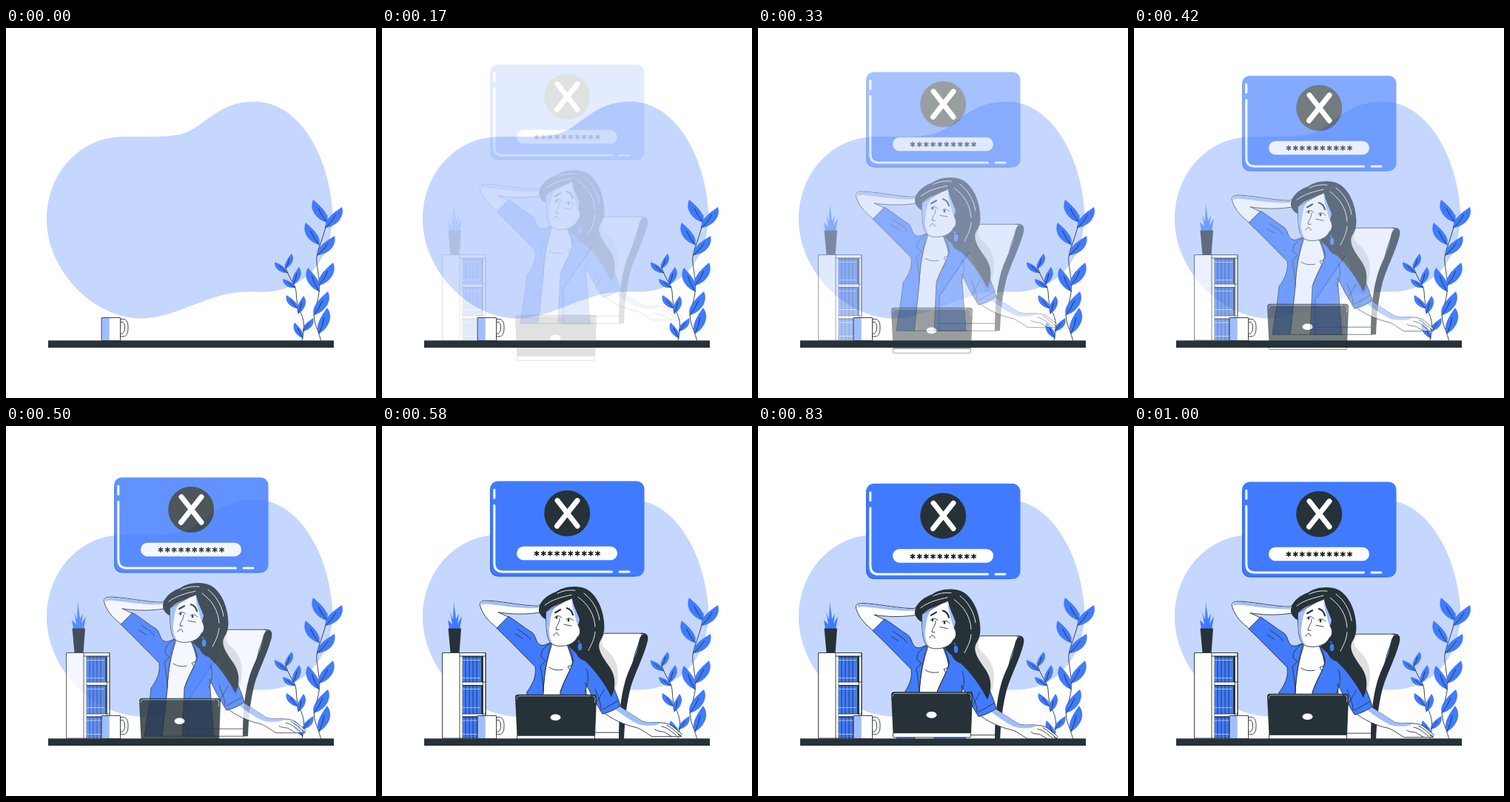
Write an HTML page that moves like this. It is 500 px wide and 500 px high and loops after 1040 ms.

```html
<!DOCTYPE html>
<html lang="en">
<head>
<meta charset="utf-8">
<title>Wrong password</title>
<style>
html, body { margin: 0; width: 100%; height: 100%; overflow: hidden; background: #fff; }
svg { display: block; width: 100vw; height: 100vh; }
.ink { fill: #263238; }
.blue { fill: #407bff; }
.pale { fill: #9fbdff; }
.white { fill: #fff; }
.line { fill: none; stroke: #263238; stroke-width: .9; stroke-linecap: round; stroke-linejoin: round; }
.edge { stroke: #263238; stroke-width: .9; stroke-linejoin: round; }
.shine { fill: none; stroke: #fff; stroke-linecap: round; stroke-linejoin: round; }
.stars { font: 14px "DejaVu Sans", sans-serif; letter-spacing: 2.17px; fill: #111; stroke: #111; stroke-width: .6; }
</style>
</head>
<body>
<svg viewBox="0 0 500 500">
  <path fill="#c5d7ff" d="M55 257C56 195 100 149 155 147C180 146 215 149 238 143C268 135 285 99 336 99.5C398 100 436 175 441 245C444 310 405 355 350 356.5C335 357 315 355 292 361C255 371 215 394 180 392.5C115 390 54 325 55 257Z"/>

  <g id="plants">
    <path class="line" d="M425.500 422C420 402 413 395 418 378C426 355 424 345 420 318C417 300 433 282 434 253M400 422C404 405 404 395 396 380C390 365 395 355 388 345C382 335 380 330 377 320"/>
  </g>

  <g id="shelf">
    <path class="blue" d="M91 275L89 262L95 268L92 251L96 262L97 238L100 261L104 253L102 267L108 257L105 275Z"/>
    <path class="ink" d="M89.500 273.500H107L104.500 306.500H92.500Z"/>
    <path class="white edge" d="M81.500 306.500H140V422H81.500Z"/>
    <path class="line" d="M105 306.500V422M109 311V422M105 311H140"/>
    <g id="books"></g>
  </g>

  <g id="mug">
    <path class="white edge" d="M154.500 394C163 391 165 398 165 405C165 414 162 418.500 154.500 416.500V413C158 414 160.500 411 160.500 405C160.500 399 158.500 396 154.500 398Z"/>
    <path class="white" d="M129.500 391.500H154.500V422.500H129.500Z"/>
    <path class="pale" d="M129.500 391.500H139.700V422.500H129.500Z"/>
    <path class="line" d="M129.500 391.500H154.500V422.500H129.500Z"/>
  </g>

  <g id="panel">
    <rect class="blue" x="146" y="77.200" width="208.500" height="129" rx="11"/>
    <path fill="none" stroke="#2f5fcf" d="M146.600 90V194Q146.600 205.600 158 205.600H342"/>
    <path class="shine" stroke-width="3" d="M151.800 89V100M151.800 110V188Q151.800 199.700 163 199.700H310.500M321 199.700H334"/>
    <circle class="ink" cx="250.200" cy="120.800" r="31"/>
    <path class="shine" stroke-width="7" d="M237 103.500L264 138M264 103.500L236.500 138"/>
    <rect class="white" x="182" y="165.500" width="136" height="18.500" rx="9.200"/>
    <text class="stars" x="205.500" y="181.900">**********</text>
  </g>

  <g id="chair">
    <path class="white edge" d="M286 320C288 300 292 283 302 283H352L342 310L322 395V427H245V380Z"/>
    <path fill="#e0e0e0" d="M291 284H301C297 290 295 297 302 304C317 316 321 332 318 348C316 360 315 370 309 374L285 320Z"/>
    <path class="ink" d="M348 283C360 281 361 288 358 297C352 318 342 336 336 356C330 380 328 400 327 427H320C320 396 322 372 328 350C334 328 343 318 347 295C348 289 350 285 354 284Z"/>
    <path class="line" d="M245 417H320"/>
  </g>

  <g id="woman">
    <!-- raised arm -->
    <path class="white edge" d="M133 247C130 239 137 238.500 146 239C170 241 192 246 211 246L220 240L225 250L212 255C192 258 172 257 157 254.500L171 261L156 276C147 269 137 260 133 247Z"/>
    <path class="pale" d="M135 241C140 239.500 146 239.500 150 240C172 242 192 247 212 246.500L211 249C190 250 168 246 148 244C143 243 138 243 134 245Z"/>
    <!-- back hair -->
    <path class="ink" d="M248 226C272 215 290 232 296 252C303 272 301 284 295 293C289 304 300 317 308 329C317 343 315 356 311 369C300 352 286 334 274 321C262 318 250 317 248 309Z"/>
    <!-- lower arm and hand -->
    <path class="white edge" d="M297 388L320 381C330 388 341 395 352 402C362 405 370 402 378 404C385 404 389 406 393 409L404 418C406 421 403 422 400 419.500L405 422.500H365C357 418 350 412 343 410C328 407 310 399 297 388Z"/>
    <path class="pale" d="M313 384L320 381C331 388 341 395 352 402C362 405 370 402 378 404L370 407C360 408 352 408 345 405C335 400 325 393 313 384Z"/>
    <path class="line" d="M369 413C374 417 380 414 384 418L391 422M378 409C386 410 391 416 398 421M385 407C392 411 396 415 402 420"/>
    <!-- neck and top -->
    <path class="white edge" d="M231 292L229 300C224 315 219 335 218 362L211 427H246L243 362L258 325L252 295Z"/>
    <path class="line" d="M226 329C232 333 238 333 244 332"/>
    <!-- jacket -->
    <path class="blue edge" d="M155 276L171 260C181 266 193 276 203 282C208 286 208 296 213 298C218 301 223 297 229 295C222 318 219 340 218 362L211 427H187C190 405 194 385 196 362C203 352 209 342 207 328C189 310 172 292 155 276Z"/>
    <path class="blue edge" d="M250 298L262 309C276 312 287 317 293 322C304 340 316 358 322 381C315 386 307 390 298 392C294 386 290 378 285 370L275 350L281 427H238L241 362C248 343 255 333 258 320Z"/>
    <path class="line" d="M229 295C219 302 214 307 215 315L221 320L214 327C216 340 218 350 218 362M250 298C257 310 260 318 257 326L251 328L254 333C248 344 244 352 241 362M276 331C280 340 279 350 274 362M183 277C190 283 196 284 201 292M180 284L190 290M288 358C291 367 296 376 296 386M300 359C296 368 291 373 289 379M319 374L298 386"/>
    <path class="ink" d="M262 309C278 311 289 316 293 321C304 335 316 347 313 361L310 369C301 351 288 333 274 320C268 318 264 315 262 309Z"/>
    <!-- face -->
    <path class="white edge" d="M222 254C221 268 222 283 225 291C228 299 236 301 245 300C254 299 261 295 264 288C268 286 269 278 265 272L257 234Z"/>
    <path class="pale" d="M222 254L234 248C227 257 228 266 226 275C225 283 227 291 231 297C225 294 222 282 222 268Z"/>
    <path class="pale" d="M256 237L258 250C261 259 262 267 265 272L267 264Z"/>
    <path class="line" d="M240 263C240 270 235 273 235 278H239M232 286C234 281 238 281 239 286M233 262C236 258 240 259 243 262M249 264C252 261 256 263 259 266M246 271L256 273"/>
    <path fill="none" stroke="#263238" stroke-width="2.200" stroke-linecap="round" d="M234 255L241 251M250 249C254 250 257 254 258 258"/>
    <ellipse class="ink" cx="236" cy="261.500" rx="1.300" ry="2"/>
    <ellipse class="ink" cx="252" cy="265" rx="1.300" ry="2.200"/>
    <!-- front hair -->
    <path class="ink" d="M213 256C208 244 222 231 235 227C244 220 263 217 276 223C292 231 301 256 300 274C299 286 294 296 286 306L266 304C270 294 272 284 269 270C267 258 259 247 257 236C245 241 229 246 222 254L221 264C217 262 215 259 213 256Z"/>
    <path class="shine" stroke-width=".9" d="M220 245C230 237 243 234 256 231M237 229C245 225 254 224 261 225M265 234C278 243 287 257 288 274M273 229C284 237 292 251 294 265M288 281C287 291 283 298 279 306"/>
    <circle class="blue" cx="266" cy="294" r="1.200"/>
    <ellipse class="blue" cx="267.500" cy="301" rx="2.800" ry="5"/>
  </g>

  <g id="laptop">
    <rect class="white edge" x="182.500" y="415" width="105" height="6.500" rx="1"/>
    <path class="ink" d="M180 364Q180 360 184 360H286Q290 360 290 364L288 416H182.500Z"/>
    <path class="shine" stroke-width=".6" d="M182 366Q182 362 186 362H282M285 362Q288 362 288 366L287.500 371"/>
    <ellipse class="white" cx="234.500" cy="391" rx="7" ry="4.300"/>
  </g>

  <rect class="ink" x="57" y="422.300" width="386" height="9.700"/>
</svg>
<script>
const $ = id => document.getElementById(id);

function add(parent, cls, d) {
  const p = document.createElementNS("http://www.w3.org/2000/svg", "path");
  p.setAttribute("class", cls);
  p.setAttribute("d", d);
  parent.append(p);
}

// A leaf from its base to its tip, fuller on the lower side.
function leaf(bx, by, tx, ty) {
  const dx = tx - bx, dy = ty - by, s = dx < 0 ? -1 : 1;
  const at = (u, v) => `${(bx + u * dx - v * s * dy).toFixed(1)} ${(by + u * dy + v * s * dx).toFixed(1)}`;
  add($("plants"), "blue", `M${at(0, 0)}C${at(.25, .25)} ${at(.75, .36)} ${at(1, 0)}C${at(.7, -.1)} ${at(.2, -.26)} ${at(0, 0)}Z`);
  add($("plants"), "line", `M${at(0, 0)}Q${at(.35, .05)} ${at(.62, 0)}`);
}

[
  [434, 263, 415, 232], [432, 270, 454, 242], [423, 293, 405, 263], [421, 307, 444, 281],
  [423, 356, 408, 324], [423, 348, 442, 317], [416, 388, 435, 356], [423, 413, 434, 378],
  [380, 331, 363, 316], [378, 325, 386, 305], [388, 347, 396, 323], [391, 351, 374, 339],
  [395, 386, 402, 362], [394, 379, 379, 361], [401, 410, 415, 392], [401, 419, 390, 398]
].forEach(l => leaf(...l));

// Three rows of books with a board below each.
for (const [top, end] of [[311, 346], [350, 389], [392.500, 422]]) {
  const row = $("books"), low = Math.min(end - 6, top + 30);
  add(row, "blue", `M109 ${top}H133.500V${end}H109Z`);
  add(row, "ink", `M133.500 ${top}H136.500V${end}H133.500ZM109 ${top}H136.500V${top + 1.5}H109Z`);
  for (let x = 113; x < 133; x += 5) add(row, "line", `M${x} ${top}V${end}`);
  add(row, "pale", `M109 ${top + 5}H133V${top + 6}H109ZM109 ${low}H133V${low + 1}H109Z`);
  add(row, "white", `M109 ${end}H140V${end + 3}H109Z`);
  add(row, "line", `M109 ${end}H140`);
}
add($("books"), "line", "M136.500 311V422M140 306.500V422");

const LOOP = 1040, STEP = 1000 / 24;
const fading = ["shelf", "panel", "chair", "woman", "laptop"].map($);
const down = ["panel", "chair", "woman"].map($);

function draw(ms) {
  const n = Math.min(24, Math.floor((ms + 5) / STEP));
  const shown = Math.max(0, Math.min(1, (n - 2) / 12));
  const sway = n > 14 ? 3.500 * Math.sin(Math.PI * (n - 14) / 11) : 0;
  const y = 30 * (shown - 1) + sway - 2.800;
  fading.forEach(g => g.setAttribute("opacity", shown ** 1.1));
  down.forEach(g => g.setAttribute("transform", `translate(0 ${y})`));
  $("laptop").setAttribute("transform", `translate(0 ${-y})`);
}

const start = performance.now();
function tick() {
  draw((performance.now() - start) % LOOP);
  requestAnimationFrame(tick);
}
tick();
</script>
</body>
</html>
```
